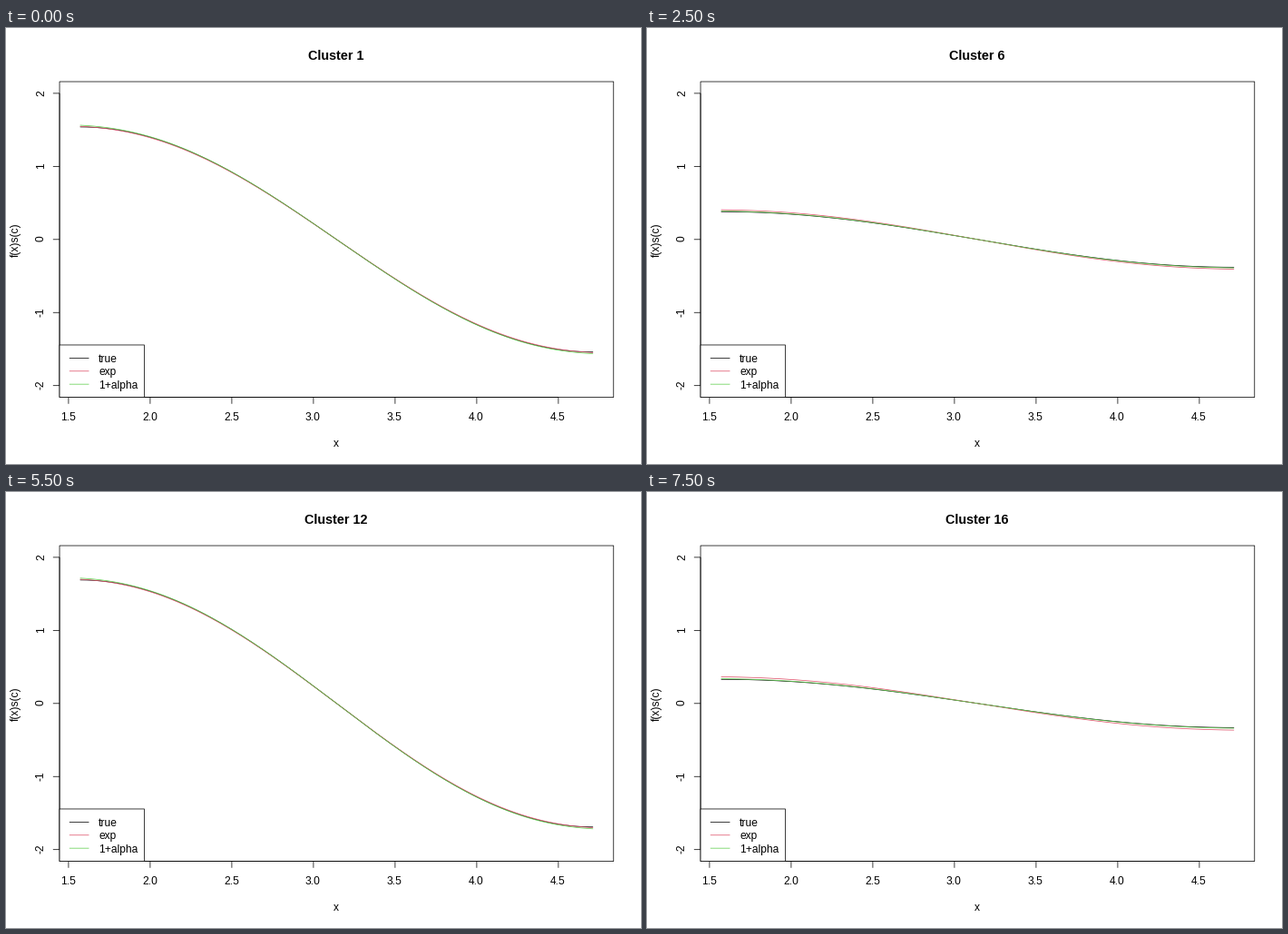
Animation, 700 px wide and 480 px high, one loop 8000 ms. Source, as a matplotlib script:

```python
import numpy as np
import matplotlib.pyplot as plt
from matplotlib.animation import FuncAnimation
from matplotlib.patches import Rectangle

W, H, DPI = 700, 480, 100
PX = 72 / DPI  # points per pixel
THIN = 0.75 * PX
LINE = 14.4  # text line height, also the title size
LEFT, RIGHT, TOP, BOTTOM = 59.04, 669.76, 59.04, 406.56
MID = (LEFT + RIGHT) / 2
KEYS = {"true": "black", "exp": "#DF536B", "1+alpha": "#61D04F"}

# true scale s(c) of each cluster
SCALES = [1.54, 0.74, 0.5, 1.35, 0.43, 0.38, 1.73, 0.135,
          0.74, 3.45, 3.0, 1.69, 0.81, 1.05, 1.34, 0.33]

plt.rcParams["font.family"] = "Liberation Sans"
fig = plt.figure(figsize=(W / DPI, H / DPI), dpi=DPI, facecolor="white")
ax = fig.add_axes([0, 0, 1, 1])
ax.set_xlim(0, W)
ax.set_ylim(H, 0)
ax.axis("off")


def px(x):
    return LEFT + (x - 0.46 * np.pi) * (RIGHT - LEFT) / (1.08 * np.pi)


def py(y):
    return (TOP + BOTTOM) / 2 - y * (BOTTOM - TOP) / 4.32


def line(xs, ys, color="black", z=3):
    return ax.plot(xs, ys, color=color, lw=THIN, snap=False, zorder=z,
                   solid_capstyle="butt", solid_joinstyle="round")[0]


def box(x0, y0, x1, y1, fill, z):
    patch = Rectangle((x0, y0), x1 - x0, y1 - y0, fc=fill, ec="black",
                      lw=THIN, zorder=z, snap=False)
    return ax.add_patch(patch)


def label(x, y, s, ha="center", size=12, **kw):
    return ax.text(x, y, s, ha=ha, va="baseline", fontsize=size * PX,
                   rotation_mode="anchor", zorder=6, **kw)


# frame and axes
box(LEFT, TOP, RIGHT, BOTTOM, "none", 3)
line([px(1.5), px(4.5)], [BOTTOM] * 2)
line([LEFT] * 2, [py(-2), py(2)])
for v in np.arange(1.5, 4.6, 0.5):
    line([px(v)] * 2, [BOTTOM, BOTTOM + LINE / 2])
    label(px(v) - 0.5, 432, f"{v:.1f}")
for v in range(-2, 3):
    line([LEFT - LINE / 2, LEFT], [py(v)] * 2)
    label(42, py(v) - 0.7, str(v), rotation=90)
label(MID - 0.7, 461, "x")
label(13.8, py(0), "f(x)s(c)", rotation=90)
title = label(MID - 0.7, 35, "", size=LINE, weight="bold")

# legend
legend_top = BOTTOM - 4 * LINE
box(LEFT, legend_top, 152.5, BOTTOM, "white", 4)
for i, (name, color) in enumerate(KEYS.items(), 1):
    y = legend_top + LINE * i
    line([LEFT + 10.8, LEFT + 32.4], [y, y], color, 5)
    label(LEFT + 43.2, y + 4.4, name, ha="left")

# curves
u = np.linspace(-np.pi / 2, np.pi / 2, 150)
exact = -np.sin(u)
fitted = exact - 0.012 * (u / (np.pi / 2)) ** 9  # fits overshoot at the ends
clip = Rectangle((LEFT, TOP), RIGHT - LEFT, BOTTOM - TOP,
                 transform=ax.transData)
curves = [line(px(u + np.pi), py(exact), c, 2) for c in KEYS.values()]
for curve in curves:
    curve.set_clip_path(clip)


def draw(k):
    s = SCALES[k]
    # the exponential fit overestimates small scales
    exp_fit = s + 0.21 * np.exp(-s / 0.2) - 0.01
    alpha_fit = s + 0.005
    title.set_text(f"Cluster {k + 1}")
    for curve, ys in zip(curves, (s * exact, exp_fit * fitted,
                                  alpha_fit * fitted)):
        curve.set_ydata(py(ys))
    return [title, *curves]


anim = FuncAnimation(fig, draw, frames=len(SCALES), interval=500,
                     repeat=True, repeat_delay=0)
plt.show()
```
